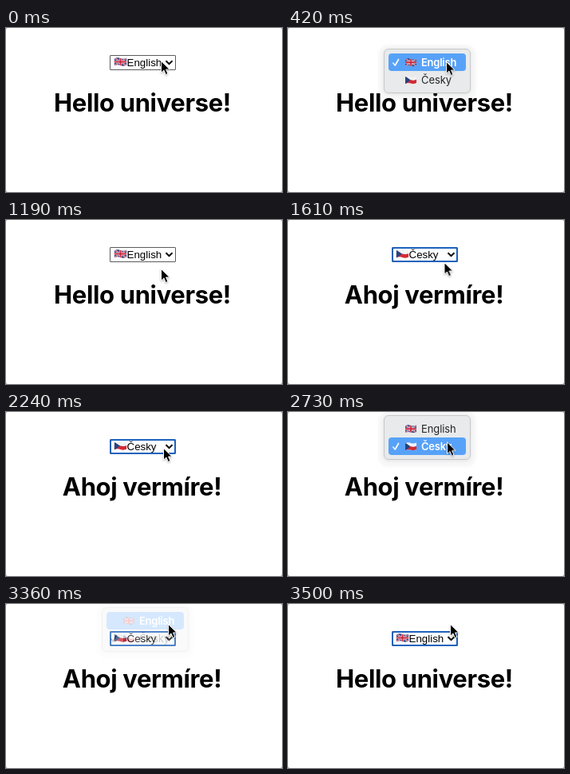
These frames come from a looping animation (346 by 206 pixels, 3.85 s). An HTML page:

```html
<!DOCTYPE html>
<html lang="en">
<head>
<meta charset="utf-8">
<title>Language switch</title>
<style>
html, body { margin: 0; width: 100%; height: 100%; overflow: hidden; background: #8c8c8c; }
#stage { position: absolute; left: 0; top: 0; width: 346px; height: 206px; overflow: hidden; background: #fff; border-radius: 2px; }
#stage svg { position: absolute; overflow: visible; }
.anim { animation: 3850ms step-end infinite; }
.page { left: 0; top: 0; width: 346px; height: 206px; }
.title { font: 700 31px Inter, sans-serif; letter-spacing: -.35px; text-anchor: middle; }
.value { font: 13.33px "Liberation Sans", Arial, sans-serif; }
.en { animation-name: en; }
.cs { animation-name: cs; }
.ring { animation-name: ring; }
.menu {
  position: absolute; left: 120px; top: 26px; width: 107px; height: 54px;
  background: #e8eaeb; border: 1px solid #c6c8c9; border-radius: 6px;
  box-shadow: 0 1px 4px rgba(0, 20, 20, .1), 0 2px 3px 7px rgba(40, 60, 60, .04);
  animation-name: menu;
}
.row { left: 5px; width: 97px; height: 22px; border-radius: 4px; font: 13px Inter, sans-serif; letter-spacing: -.1px; }
.row text { fill: currentColor; }
.check { fill: none; stroke: currentColor; stroke-width: 1.6; stroke-linecap: round; stroke-linejoin: round; }
.first { top: 5px; animation-name: first; }
.second { top: 27px; animation-name: second; }
.cursor { left: -.5px; top: 0; width: 14px; height: 20px; filter: drop-shadow(0 1px 1px rgba(0, 0, 0, .3)); animation-name: cursor; }

@keyframes en { 0%, 90.909% { opacity: 1 } 32.727% { opacity: 0 } }
@keyframes cs { 0%, 90.909% { opacity: 0 } 32.727% { opacity: 1 } }
@keyframes ring { 0% { opacity: 0 } 32.727%, 100% { opacity: 1 } }
@keyframes menu {
  0% { opacity: 0; transform: none }
  3.636% { opacity: 1 }
  23.636% { opacity: 1; animation-timing-function: steps(4) }
  30.909% { opacity: 0 }
  32.727% { transform: translateY(-22px) }
  60% { opacity: 1 }
  81.818% { opacity: 1; animation-timing-function: steps(4) }
  89.09%, 100% { opacity: 0; transform: translateY(-22px) }
}
@keyframes first {
  0%, 74.545%, 83.636% { background: #57a2f8; color: #fff; font-weight: 600; letter-spacing: -.25px }
  16.363%, 81.818% { background: #57a2f800; color: #252627; font-weight: 400; letter-spacing: -.1px }
}
@keyframes second {
  0%, 23.636%, 74.545%, 100% { background: #57a2f800; color: #252627; font-weight: 400; letter-spacing: -.1px }
  16.363%, 25.454% { background: #57a2f8; color: #fff; font-weight: 600; letter-spacing: -.25px }
}
@keyframes cursor {
  0% { transform: translate(194px, 41px); animation-timing-function: steps(4) }
  7.272% { transform: translate(198px, 41.5px) }
  10.909% { transform: translate(198px, 42px); animation-timing-function: steps(5) }
  20% { transform: translate(196px, 65px); animation-timing-function: steps(1) }
  21.818% { transform: translate(194px, 61px) }
  38.181% { transform: translate(194px, 61px); animation-timing-function: steps(4) }
  45.454% { transform: translate(197px, 45px) }
  67.272% { transform: translate(197px, 45px); animation-timing-function: steps(5) }
  76.363% { transform: translate(202px, 26px); animation-timing-function: steps(2) }
  80%, 100% { transform: translate(203px, 25px) }
}
</style>
</head>
<body>
<div id="stage">
  <svg class="page" viewBox="0 0 346 206">
    <defs>
      <clipPath id="wave"><path d="M0 3Q8 -1 16 2T32 1V19Q24 23 16 20T0 21Z"/></clipPath>
      <symbol id="uk" viewBox="0 0 32 22" preserveAspectRatio="none">
        <g clip-path="url(#wave)">
          <rect width="32" height="22" fill="#2b3b7c"/>
          <path d="M0 1L32 21M32 1L0 21" stroke="#e6e4ec" stroke-width="4"/>
          <path d="M0 1L32 21M32 1L0 21" stroke="#cf3049" stroke-width="1.8"/>
          <path d="M16 0V22M0 11H32" stroke="#eceaf0" stroke-width="6.4"/>
          <path d="M16 0V22M0 11H32" stroke="#cb2840" stroke-width="4"/>
        </g>
      </symbol>
      <symbol id="cz" viewBox="0 0 32 22" preserveAspectRatio="none">
        <g clip-path="url(#wave)">
          <rect width="32" height="22" fill="#f2f2f2"/>
          <path d="M0 12Q8 9 16 11T32 10V22H0Z" fill="#d22a35"/>
          <path d="M0 1L15 11L0 22Z" fill="#27437f"/>
        </g>
      </symbol>
    </defs>
    <rect x="130.5" y="34.5" width="82" height="18" rx=".5" fill="#fff" stroke="#5c5c5c"/>
    <rect class="anim ring" x="131" y="35" width="81" height="17" rx="2" fill="#fff" stroke="#1c62bd" stroke-width="2"/>
    <path d="M200.5 41.2L204.5 45.2L208.5 41.2" fill="none" stroke="#000" stroke-width="2"/>
    <g class="anim en">
      <use href="#uk" x="135.5" y="37" width="16" height="11"/>
      <text class="value" x="151.5" y="48">English</text>
      <text class="title" x="171" y="105">Hello universe!</text>
    </g>
    <g class="anim cs">
      <use href="#cz" x="135.5" y="37" width="16" height="11"/>
      <text class="value" x="151.5" y="48">Česky</text>
      <text class="title" x="170.6" y="105">Ahoj vermíre!</text>
    </g>
  </svg>

  <div class="menu anim">
    <svg class="row first anim" viewBox="0 0 97 22">
      <path class="check anim en" d="M5.8 12L8.3 15L12.5 7.5"/>
      <use href="#uk" x="21" y="6" width="14" height="10.5"/>
      <text x="41" y="16">English</text>
    </svg>
    <svg class="row second anim" viewBox="0 0 97 22">
      <path class="check anim cs" d="M5.8 12L8.3 15L12.5 7.5"/>
      <use href="#cz" x="21" y="6" width="14" height="10.5"/>
      <text x="41" y="16">Česky</text>
    </svg>
  </div>

  <svg class="cursor anim" viewBox="0 0 14 20">
    <path d="M.5 .5V15.2L3.9 12L6.3 17.6L9 16.4L6.6 11H11.2Z" fill="#000" stroke="#fff" stroke-width="1" stroke-linejoin="round"/>
  </svg>
</div>
</body>
</html>
```
